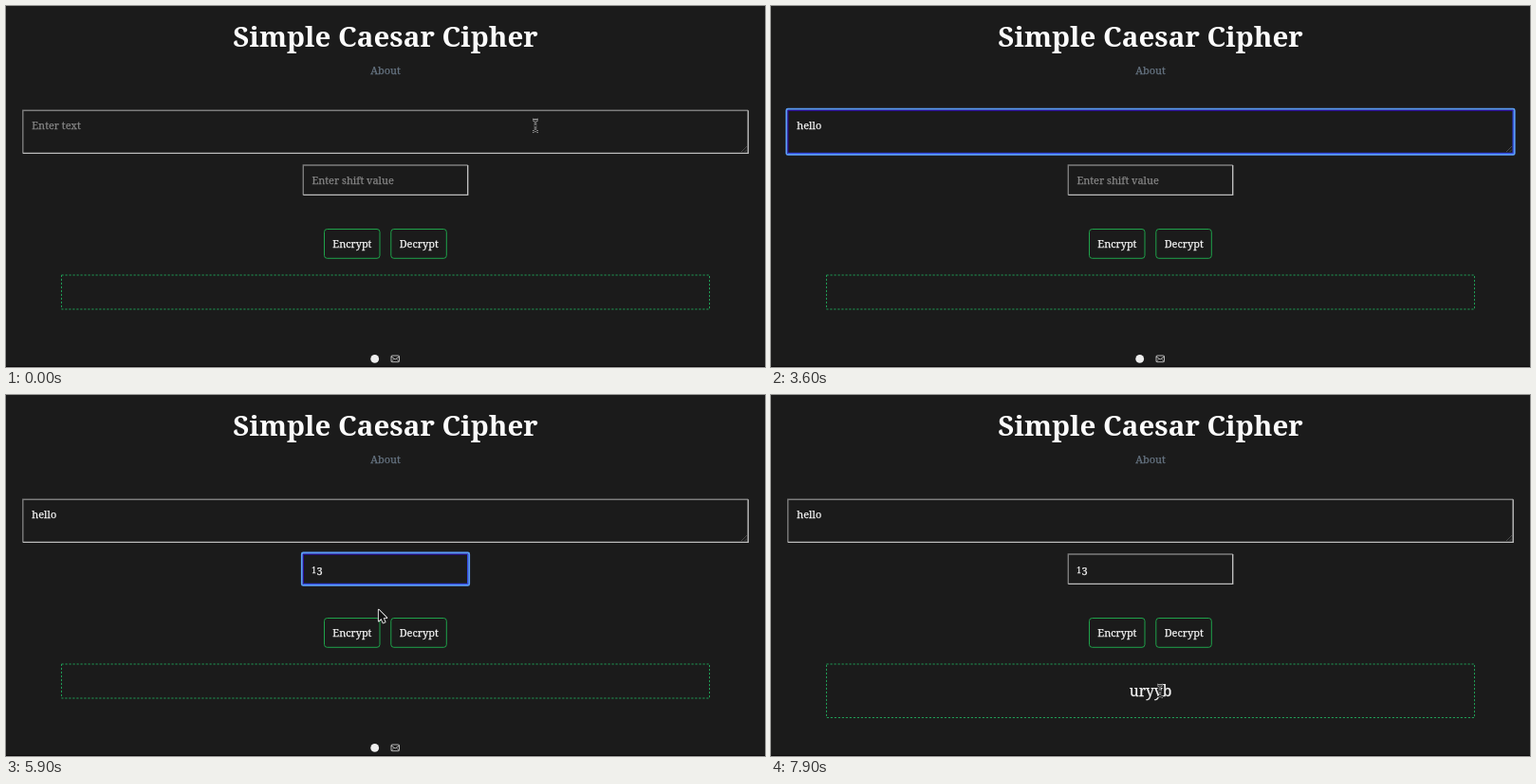
An HTML page with a canvas for the animation above (8000 ms loop, 800 by 381 pixels).

```html
<!DOCTYPE html>
<html lang="en">
<head>
<meta charset="utf-8">
<title>Simple Caesar Cipher</title>
<style>
  html, body { margin: 0; width: 100%; height: 100%; overflow: hidden; background: #1b1b1b; }
  canvas { display: block; width: 100vw; height: 100vh; }
</style>
</head>
<body>
<canvas id="stage" width="800" height="381"></canvas>
<script>
const ctx = document.getElementById('stage').getContext('2d');
const LOOP = 8000, STEP = 100;
const SERIF = '"Noto Serif", Georgia, serif';
const WHITE = '#f6f6f6', GRAY = '#858585';
const BODY = 10.95;
const CLICK_AREA = 1400, CLICK_SHIFT = 4400, CLICK_ENCRYPT = 6200;

const areaKeys = [[2400, 'h'], [2500, 'he'], [3000, 'hel'], [3100, 'hell'], [3300, 'hello']];
const shiftKeys = [[4900, '1'], [5100, '13']];
const pointerMoves = [
  { from: 3700, to: 4200, a: [558, 126], b: [473, 187] },
  { from: 5600, to: 5900, a: [473, 187], b: [392, 226] },
  { from: 5900, to: 6200, a: [392, 226], b: [389, 240] },
  { from: 7100, to: 7900, a: [389, 240], b: [410, 312] }
];

const between = (t, a, b) => t >= a && t < b;
const typed = (keys, t) => keys.reduce((text, [at, value]) => t >= at ? value : text, '');
const inside = (x, y, l, t, r, b) => x >= l && x <= r && y >= t && y <= b;

// A hairline stroke gives the regular weight a little more body.
function label(text, x, y, size, color, align = 'left', weight = 400) {
  ctx.font = `${weight} ${size}px ${SERIF}`;
  ctx.textAlign = align;
  ctx.fillStyle = ctx.strokeStyle = color;
  ctx.lineWidth = 0.25;
  ctx.fillText(text, x, y);
  if (weight === 400) ctx.strokeText(text, x, y);
  return ctx.measureText(text).width;
}

function roundBox(l, t, r, b, radius, color, width) {
  ctx.strokeStyle = color;
  ctx.lineWidth = width;
  ctx.beginPath();
  ctx.roundRect(l, t, r - l, b - t, radius);
  ctx.stroke();
}

function line(points, color, width) {
  ctx.strokeStyle = color;
  ctx.lineWidth = width;
  ctx.beginPath();
  points.forEach(([x, y]) => ctx.lineTo(x, y));
  ctx.stroke();
}

function field(l, t, r, b, focused) {
  const [dark, light] = focused ? ['#2b0d96', '#3348e0'] : ['#7c7c7c', '#bdbdbd'];
  line([[l, b], [l, t], [r, t]], dark, 1.4);
  line([[r, t], [r, b], [l, b]], light, 1.4);
  if (focused) roundBox(l - 1.5, t - 1.5, r + 1.5, b + 1.5, 1.5, '#5b9df8', 1.8);
}

function caret(x, y) {
  ctx.fillStyle = '#d8d8d8';
  ctx.fillRect(Math.round(x), y, 1, 14);
}

function resizeGrip() {
  line([[775, 154], [781, 148]], '#555', 0.8);
  line([[778.5, 154], [781, 151.5]], '#555', 0.8);
}

// Old-style figures: a short 1 and a lowered 3.
function shiftValue(text) {
  if (text) label('1', 322.3, 188, 8.2, WHITE);
  if (text.length > 1) label('3', 327.4, 190, BODY, WHITE);
}

function button(text, l) {
  roundBox(l, 235.5, l + 58.5, 266.3, 3, '#1fa24a', 1);
  label(text, l + 29.4, 255, BODY, WHITE, 'center');
}

function footer() {
  ctx.fillStyle = '#eee';
  ctx.beginPath();
  ctx.arc(388.7, 372.4, 4.4, 0, Math.PI * 2);
  ctx.fill();
  roundBox(406, 369, 414.5, 375.7, 1, '#ddd', 0.8);
  line([[406, 370], [410.2, 373], [414.5, 370]], '#ddd', 0.8);
  line([[406.3, 375.3], [409, 372.3]], '#ddd', 0.6);
  line([[414.2, 375.3], [411.5, 372.3]], '#ddd', 0.6);
}

function outlined(path, fill) {
  ctx.lineJoin = 'round';
  ctx.strokeStyle = '#f2f2f2';
  ctx.lineWidth = 1.8;
  ctx.stroke(path);
  ctx.fillStyle = fill;
  ctx.fill(path);
  ctx.lineJoin = 'miter';
}

const shapes = {
  beam: new Path2D('M-3-6Q-.5-6 0-4.5Q.5-6 3-6M0-4.5V5M-3 6.5Q-.5 6.5 0 5Q.5 6.5 3 6.5M-1.2 .5H1.2'),
  arrow: new Path2D('M.8.6V12.5L3.5 10L5.5 14.4L7.6 13.5L5.7 9.2H9.3Z'),
  hand: new Path2D('M-1 1Q0-.3 1 1L2 5L2.5 3.8Q4 3 4.5 4.3Q6 3.6 6.4 5Q8 4.6 8 6.3L7.7 9.5L6.4 13.2H.6L-3.5 8.4Q-3.5 6.7-1.8 7.4L.2 8.4Z')
};

function pointerAt(t) {
  let pos = [558, 126];
  for (const { from, to, a, b } of pointerMoves) {
    if (t < from) break;
    const p = Math.min(1, (t - from) / (to - from));
    const k = p * p * (3 - 2 * p);
    pos = a.map((v, i) => v + (b[i] - v) * k);
  }
  return pos;
}

function pointer(t) {
  if (between(t, 2400, 3800) || between(t, 4900, 5700)) return;
  const [x, y] = pointerAt(t);
  const onText = inside(x, y, 17, 109, 783, 156) || inside(x, y, 313, 167, 487, 200) ||
    (t >= CLICK_ENCRYPT && inside(x, y, 377, 302, 423, 323));
  ctx.save();
  ctx.translate(x, y);
  if (onText) {
    for (const [color, width] of [['#cfcfcf', 2.3], ['#151515', 1.1]]) {
      ctx.strokeStyle = color;
      ctx.lineWidth = width;
      ctx.stroke(shapes.beam);
    }
  } else if (inside(x, y, 335, 235, 394, 267)) {
    outlined(shapes.hand, '#111');
    line([[2.2, 8], [2.4, 11]], '#ddd', 0.6);
    line([[4.2, 8], [4.2, 11]], '#ddd', 0.6);
  } else {
    outlined(shapes.arrow, '#111');
  }
  ctx.restore();
}

function scrollbar(t) {
  if (!between(t, CLICK_ENCRYPT, 7000)) return;
  ctx.globalAlpha = t >= 6900 ? 0.5 : 1;
  ctx.fillStyle = '#555';
  ctx.beginPath();
  ctx.roundRect(795, -4, 4, 332.5, 2);
  ctx.fill();
  ctx.globalAlpha = 1;
}

function draw(t) {
  const encrypted = t >= CLICK_ENCRYPT;
  ctx.fillStyle = '#1b1b1b';
  ctx.fillRect(0, 0, 800, 381);
  label('Simple Caesar Cipher', 400, 43, 29.55, '#fcfcfc', 'center', 700);
  label('About', 400, 72, BODY, '#667482', 'center');

  const areaFocus = between(t, CLICK_AREA, CLICK_SHIFT);
  const text = typed(areaKeys, t);
  field(17.8, 110.2, 782.2, 155.4, areaFocus);
  resizeGrip();
  const width = label(text || 'Enter text', 27.3, 130, BODY, text ? WHITE : GRAY);
  if (between(t, CLICK_AREA, 1900) || between(t, 2400, 3600)) caret(27 + (text ? width : 0), 119);

  const shift = typed(shiftKeys, t);
  field(313.3, 168, 486.7, 199.4, between(t, CLICK_SHIFT, CLICK_ENCRYPT));
  if (shift) shiftValue(shift);
  else label('Enter shift value', 322.4, 188, BODY, GRAY);
  if (between(t, CLICK_SHIFT, 5500)) caret(322 + shift.length * 6, 177);

  button('Encrypt', 335.5);
  button('Decrypt', 405.8);

  ctx.setLineDash([2.2, 1.8]);
  roundBox(58.5, 284, 741.5, encrypted ? 340.5 : 320, 0, '#1f9c55', 1);
  ctx.setLineDash([]);
  if (encrypted) label('uryyb', 400, 318, 15.6, WHITE, 'center');
  else footer();

  ctx.fillStyle = '#0b090a';
  ctx.fillRect(0, 380, 800, 1);
  scrollbar(t);
  pointer(t);
}

const start = performance.now();
function tick() {
  const elapsed = (performance.now() - start) % LOOP;
  draw(Math.floor(elapsed / STEP) * STEP);
  requestAnimationFrame(tick);
}
tick();
</script>
</body>
</html>
```
